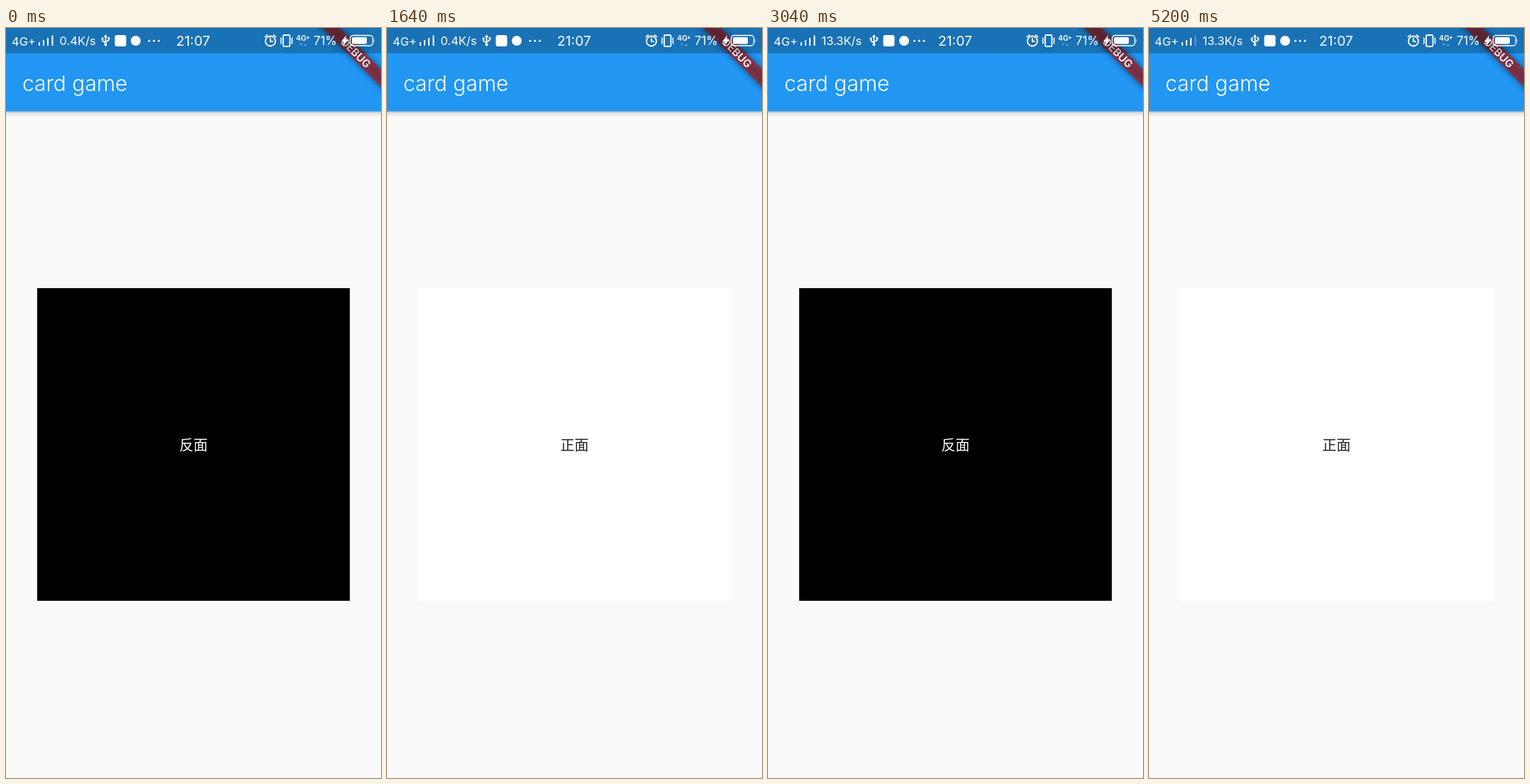
Recreate the animation shown at these times as an HTML page. Size 529 by 1058 pixels, loop 5400 ms.

```html
<!DOCTYPE html>
<html lang="zh-CN">
<head>
<meta charset="utf-8">
<title>card game</title>
<style>
  html, body { margin: 0; width: 100%; height: 100%; overflow: hidden; background: #fafafa; }
  svg { display: block; width: 100%; height: 100%; font-family: Inter, Roboto, sans-serif; }
  .face { font: 20px "Noto Sans CJK SC", "Noto Sans CJK", sans-serif; text-anchor: middle; }
  .line { fill: none; stroke: #fff; stroke-width: 1.8; stroke-linecap: round; stroke-linejoin: round; }
</style>
</head>
<body>
<svg viewBox="0 0 529 1058">
  <defs>
    <linearGradient id="shade" x2="0" y2="1">
      <stop stop-opacity=".3"/>
      <stop offset=".35" stop-opacity=".1"/>
      <stop offset="1" stop-opacity="0"/>
    </linearGradient>
    <filter id="blur" x="-20%" y="-100%" width="140%" height="300%"><feGaussianBlur stdDeviation="4"/></filter>
  </defs>
  <rect width="529" height="1058" fill="#fafafa"/>

  <g id="card">
    <rect id="paper" x="-220.5" y="367" width="441" height="441"/>
    <text id="label" class="face" y="595.5"></text>
  </g>

  <rect y="117" width="529" height="9" fill="url(#shade)"/>
  <rect width="529" height="117.5" fill="#2196f3"/>
  <text x="23" y="89" font-size="30" font-weight="300" fill="#fff">card game</text>

  <g transform="translate(529) rotate(45)">
    <rect x="-70" y="41.1" width="140" height="17.7" opacity=".5" filter="url(#blur)"/>
    <rect x="-70" y="41.1" width="140" height="17.7" fill="#b71c1c" fill-opacity=".627"/>
    <text y="55.3" font-size="15" font-weight="600" text-anchor="middle" fill="#fff">DEBUG</text>
  </g>
  <rect width="529" height="35.5" opacity=".25"/>

  <g fill="#fff" font-size="16.5">
    <text x="8" y="25">4G+</text>
    <path d="M46 20h2v5h-2zM52 17h2v8h-2zM58 14h2v11h-2z"/>
    <path id="bar" d="M64.5 10.5h2v14.5h-2z"/>
    <text id="speed" x="75.5" y="24.3"></text>
    <g id="icons">
      <path class="line" stroke-width="1.4" d="M140.500 12v11M136 15.500v2.500l4.500 3M145 15v2l-4.500 3"/>
      <path d="M140.500 9l2.700 4h-5.400zM134.700 13.500h2.800v2.800h-2.800zM143.500 13h2.800v2.800h-2.800z"/>
      <circle cx="140.500" cy="23.500" r="2"/>
      <rect x="153.500" y="10" width="16" height="16" rx="3"/>
      <circle cx="183" cy="18" r="7"/>
    </g>
    <path id="dots" class="line" stroke-width="3" d="M202 18h.01M208.700 18h.01M215.500 18h.01" style="stroke-width:3"/>
    <text x="240" y="25.300" font-size="19.300">21:07</text>

    <g class="line">
      <circle cx="373" cy="18.500" r="7"/>
      <path d="M373 14.500v4.500h3M365.500 12.500l3-2.500M380.500 12.500l-3-2.500"/>
      <rect x="391" y="10" width="9.500" height="16" rx="1.500"/>
      <path stroke-width="1.500" d="M387.500 14l1 2-1 2 1 2-1 2M404 14l-1 2 1 2-1 2 1 2"/>
    </g>
    <text x="409" y="18" font-size="10.500" font-weight="600">4G</text>
    <text x="423" y="15.500" font-size="8.500" font-weight="700">+</text>
    <path id="arrows" d="M413.500 21.500h5l-2.500 4zM419.500 25.500h5l-2.500-4z"/>
    <text x="434" y="24.300" font-size="16.800">71%</text>
    <path d="M480 10l-7 9h4l-2 7 8-9.500h-4.500z"/>
    <rect class="line" x="485.500" y="10.500" width="32" height="14.500" rx="4" style="stroke-width:1.500"/>
    <rect x="488" y="13" width="21" height="9.500" rx="2"/>
    <path d="M519 15q1.500 2.500 0 5.500z"/>
  </g>
</svg>
<script>
  const LOOP = 5400, STEP = 40, FLIP = 462;
  const flips = [749, 2369, 3873];
  const $ = id => document.getElementById(id);
  const set = (id, name, value) => $(id).setAttribute(name, value);

  function draw(t) {
    // Progress in half turns: even means the black side is up
    let turns = 0, scale = 1;
    for (const start of flips) {
      const q = Math.min(1, Math.max(0, (t - start) / FLIP));
      turns += q >= 0.5 ? 1 : 0;
      scale *= Math.cos(Math.PI * q) ** 2;
    }
    const black = turns % 2 === 0;
    set("card", "transform", `translate(264.5) scale(${scale} 1)`);
    set("paper", "fill", black ? "#000" : "#fff");
    set("label", "fill", black ? "#fff" : "#212121");
    $("label").textContent = black ? "反面" : "正面";

    const fast = t >= 2880;
    $("speed").textContent = fast ? "13.3K/s" : "0.4K/s";
    set("icons", "transform", `translate(${fast ? 9 : 0})`);
    set("dots", "transform", `translate(${fast ? 4.5 : 0})`);
    set("bar", "opacity", t >= 3760 ? 0.3 : 1);
    set("arrows", "opacity", t >= 640 && t < 1640 ? 1 : 0.25);
  }

  const begin = performance.now();
  function tick() {
    const t = (performance.now() - begin) % LOOP;
    draw(Math.floor(t / STEP) * STEP);
    requestAnimationFrame(tick);
  }
  tick();
</script>
</body>
</html>
```
